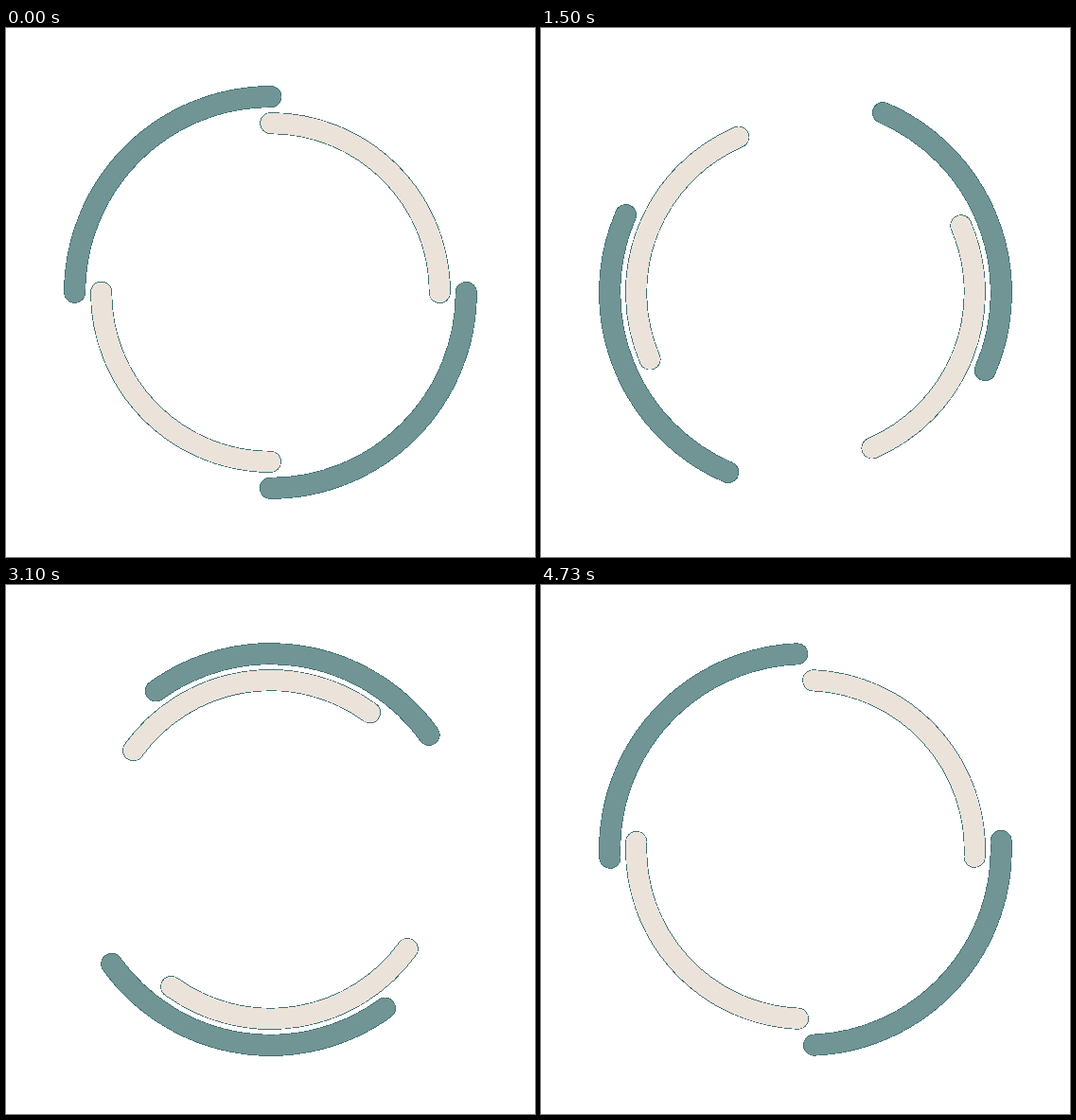
Recreate the animation shown at these times as an HTML page. Size 559 px wide and 559 px high, loop 4.76 s.

```html
<!DOCTYPE html>
<html lang="en">
<head>
<meta charset="utf-8">
<title>Double ring spinner</title>
<style>
  html, body { margin: 0; height: 100%; overflow: hidden; background: #fff; }
  svg { display: block; width: 559px; height: 559px; }
  circle { fill: none; stroke-linecap: round; shape-rendering: crispEdges; }
  .edge { stroke: #3f7073; stroke-width: 4.13; }
  .body { stroke-width: 3.84; }
  #outer .body { stroke: #719495; }
  #inner .body { stroke: #ebe3da; }
  /* Two opposite quarter arcs on each ring */
  #outer { stroke-dasharray: 58.119; }
  #inner { stroke-dasharray: 50.265; stroke-dashoffset: 50.265; }
</style>
</head>
<body>
<svg viewBox="0 0 100 100">
  <g id="outer">
    <circle class="edge" cx="50" cy="50" r="37"/>
    <circle class="body" cx="50" cy="50" r="37"/>
  </g>
  <g id="inner">
    <circle class="edge" cx="50" cy="50" r="32"/>
    <circle class="body" cx="50" cy="50" r="32"/>
  </g>
</svg>
<script>
  const LOOP = 4760, STEPS = 143;
  const outer = document.getElementById('outer');
  const inner = document.getElementById('inner');
  const start = performance.now();

  // Three steps per 100 ms, at 0, 30 and 70 ms
  function stepAt(ms) {
    const rest = ms % 100;
    return Math.floor(ms / 100) * 3 + (rest >= 30) + (rest >= 70);
  }

  function rotate(ring, angle) {
    ring.setAttribute('transform', `rotate(${angle} 50 50)`);
  }

  function draw() {
    const ms = Math.max(0, performance.now() - start) % LOOP;
    const angle = stepAt(ms) * 360 / STEPS;
    rotate(outer, angle);
    rotate(inner, -angle);
    requestAnimationFrame(draw);
  }
  draw();
</script>
</body>
</html>
```
